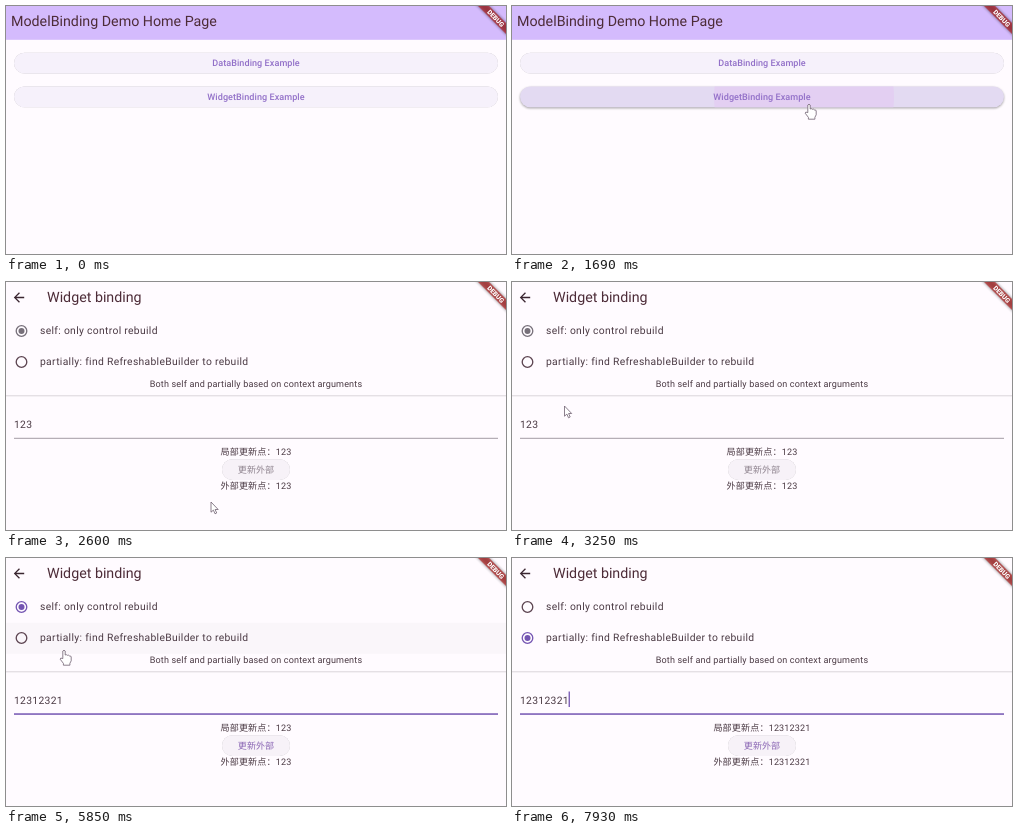
An HTML page for the animation above (8 s loop, 500 by 248 pixels).

```html
<!DOCTYPE html>
<html lang="en">
<head>
<meta charset="utf-8">
<title>Binding demo</title>
<style>
  html, body { margin: 0; width: 100%; height: 100%; overflow: hidden; background: #fffbff; }
  svg { display: block; width: 500px; height: 248px; }
  text { font-family: Roboto, "Noto Sans CJK SC", "Noto Sans CJK", sans-serif; fill: #4b3a44; white-space: pre; text-rendering: geometricPrecision; }
  .title { font-size: 14.25px; fill: #4d2c38; }
  .body { font-size: 10.34px; letter-spacing: .32px; }
  .small { font-size: 9.05px; letter-spacing: .16px; }
  .label { font-size: 9.05px; letter-spacing: .065px; font-weight: 500; fill: #9270c8; }
  .mid { text-anchor: middle; }
  .pill { fill: #f6f1fb; filter: drop-shadow(0 .7px .6px rgba(0, 0, 0, .26)); }
  .pill.hover { filter: drop-shadow(0 1px 1.1px rgba(0, 0, 0, .36)); }
  .ring { fill: none; stroke-width: 1.3; }
  .pointer { fill: #fff; stroke: #6f6070; stroke-width: .8; stroke-linejoin: round; }
</style>
</head>
<body>
<svg viewBox="0 0 500 248">
  <defs>
    <clipPath id="pillClip"><rect x="8" y="80.4" width="484" height="20.8" rx="10.4"/></clipPath>
    <clipPath id="rowClip"><rect y="64.7" width="500" height="31.2"/></clipPath>
    <filter id="blur" x="-20%" y="-150%" width="140%" height="400%"><feGaussianBlur stdDeviation="1.8"/></filter>
  </defs>

  <g id="home">
    <rect width="500" height="248" fill="#fffbff"/>
    <rect width="500" height="33.8" fill="#d4bbfd"/>
    <text class="title" x="5" y="20.2">ModelBinding Demo Home Page</text>
    <rect class="pill" x="8" y="46.8" width="484" height="20.8" rx="10.4"/>
    <text class="label mid" x="250" y="60.2">DataBinding Example</text>
    <rect id="open" class="pill" x="8" y="80.4" width="484" height="20.8" rx="10.4"/>
    <circle id="splash" cx="292" cy="91" fill="#e3cff2" clip-path="url(#pillClip)"/>
    <text class="label mid" x="250" y="93.8">WidgetBinding Example</text>
  </g>

  <g id="detail">
    <rect width="500" height="248" fill="#fffbff"/>
    <path transform="translate(5.2 7.7) scale(.65)" fill="#3a2630"
      d="M20 11H7.83l5.59-5.59L12 4l-8 8 8 8 1.41-1.41L7.83 13H20z"/>
    <text class="title" x="41" y="20.2">Widget binding</text>
    <rect id="rowHover" y="64.7" width="500" height="31.2" fill="#1d1b20" fill-opacity=".02"/>
    <circle id="rowSplash" cx="58" cy="92" fill="#1d1b20" fill-opacity=".05" clip-path="url(#rowClip)"/>
    <g id="radios"></g>
    <text class="body" x="34" y="52.4">self: only control rebuild</text>
    <text class="body" x="34" y="83.4">partially: find RefreshableBuilder to rebuild</text>
    <text class="small mid" x="250" y="105.3">Both self and partially based on context arguments</text>
    <rect y="113.3" width="500" height="1" fill="#dad4db"/>
    <text id="field" class="body" x="8" y="145.6"></text>
    <rect id="caret" y="133.5" width="1.3" height="15.5" fill="#7455b2"/>
    <rect id="line" x="8" width="484"/>
    <text id="inner" class="small mid" x="250" y="173.4"></text>
    <rect class="pill" x="216" y="177.3" width="68" height="20.8" rx="10.4" style="fill:#f7f2f8"/>
    <text id="update" class="label mid" x="250" y="191">更新外部</text>
    <text id="outer" class="small mid" x="250" y="207.4"></text>
  </g>

  <g transform="translate(489.8 12.2) rotate(45)">
    <rect x="-30" y="-3.9" width="60" height="7.8" fill-opacity=".5" filter="url(#blur)"/>
    <rect x="-30" y="-3.9" width="60" height="7.8" fill="#b71c1c" fill-opacity=".627"/>
    <text class="mid" y="2.4" style="font-size:6.6px;font-weight:900;fill:#fff">DEBUG</text>
  </g>

  <path id="arrow" class="pointer" d="M0 0V10.2L2.4 8.1 4 11.8 5.7 11 4.1 7.5H7.2Z"/>
  <path id="hand" class="pointer" d="M-1.2 1Q0-.6 1.2 1V5Q2.4 4.2 3.4 5.3 4.6 4.7 5.4 5.9 7 5.6 7.2 7V10.8L5.9 13.3V15.2H-.6V13.4L-3.8 9.2Q-3.8 7.2-1.2 8.6Z"/>
</svg>
<script>
const LOOP = 8000, TICK = 130;
const PURPLE = '#7455b2', GREY = '#77707a', INK = '#5c4450';
const OPEN = 1820, FOCUS = 3640, TYPE = 4680, PICK = 6240;

// time, x, y of the pointer tip
const path = [
  [130, 330, 185], [520, 316, 122], [910, 299, 92], [1170, 297, 98], [1950, 297, 98],
  [2340, 262, 207], [2600, 205, 220], [2990, 90, 160], [3250, 52.5, 124], [3380, 52.5, 124],
  [3640, 48, 140], [5200, 48, 140], [5330, 92, 235], [5460, 88, 200], [5590, 74, 120],
  [5720, 60, 96], [5850, 58, 92], [6500, 58, 92], [6760, 66, 140], [LOOP, 66, 140]
];
const caretOn = [[3640, 4160], [4680, 5720], [6240, 6760], [7020, 7670], [7930, LOOP]];

const $ = id => document.getElementById(id);
const set = (id, attrs) => { for (const k in attrs) $(id).setAttribute(k, attrs[k]); };
const show = (id, on) => { $(id).style.display = on ? '' : 'none'; };
const within = (t, a, b) => t >= a && t < b;
const ramp = (t, a, b) => Math.max(0, Math.min(1, (t - a) / (b - a)));

$('radios').innerHTML = [49, 80].map((y, i) =>
  `<circle id="ring${i}" class="ring" cx="15.5" cy="${y}" r="5.3"/>` +
  `<circle id="dot${i}" cx="15.5" cy="${y}" r="3"/>`).join('');

function pointerAt(t) {
  const i = path.findIndex(p => p[0] > t);
  if (i < 1) return null;
  const [a, b] = [path[i - 1], path[i]], k = ramp(t, a[0], b[0]);
  return { x: a[1] + (b[1] - a[1]) * k, y: a[2] + (b[2] - a[2]) * k };
}

function drawPointer(t) {
  const p = pointerAt(t);
  const overField = p && t > OPEN && within(p.y, 126, 157);
  const overHome = p && t <= 1950 && within(p.y, 80, 101);
  const overRow = p && t > 1950 && within(p.y, 34, 97);
  const overPill = p && t > 1950 && within(p.y, 177, 198) && within(p.x, 216, 284);
  const link = overHome || overRow || overPill;
  show('hand', p && link);
  show('arrow', p && !link && !overField);
  if (p) set(link ? 'hand' : 'arrow', { transform: `translate(${p.x} ${p.y})` });
  show('rowHover', overRow && p.y > 64);
  $('open').classList.toggle('hover', overHome);
  $('open').style.fill = !overHome ? '' : t >= 1560 ? '#e3daf2' : '#ede6f7';
}

function drawDetail(t) {
  const focused = t >= FOCUS, picked = t >= PICK ? 1 : 0;
  const tint = focused ? PURPLE : GREY;
  for (const i of [0, 1]) {
    set('ring' + i, { stroke: i === picked ? tint : INK });
    set('dot' + i, { fill: tint });
    show('dot' + i, i === picked);
  }
  const typed = Math.max(0, Math.floor((t - TYPE) / TICK) + 1);
  const value = '123' + '12321'.slice(0, typed);
  const shown = picked ? value : '123';
  $('field').textContent = value;
  $('inner').textContent = '局部更新点：' + shown;
  $('outer').textContent = '外部更新点：' + shown;
  $('update').style.fill = focused ? '#8a66b4' : '#8f848f';
  set('line', focused ? { y: 155.3, height: 1.5, fill: PURPLE } : { y: 155.8, height: 1, fill: '#a39ca5' });
  show('caret', caretOn.some(([a, b]) => within(t, a, b)));
  set('caret', { x: 8 + $('field').getComputedTextLength() - .4 });
  set('rowSplash', { r: 200 * ramp(t, 6110, 6500) });
  show('rowSplash', within(t, 6110, 6500));

  const enter = ramp(t, OPEN - TICK, OPEN + TICK);
  set('detail', { opacity: enter, transform: `translate(0 ${28 * (1 - enter)})` });
}

function draw(t) {
  show('home', t < OPEN + TICK);
  show('detail', t >= OPEN);
  set('splash', { r: 90 * ramp(t, 1430, 1690) });
  show('splash', t >= 1560);
  if (t >= OPEN) drawDetail(t);
  drawPointer(t);
}

const start = performance.now();
let last = -1;
function loop(now) {
  const t = Math.floor((Math.max(0, now - start) % LOOP) / TICK) * TICK;
  if (t !== last) draw(last = t);
  requestAnimationFrame(loop);
}
draw(0);
requestAnimationFrame(loop);
</script>
</body>
</html>
```
